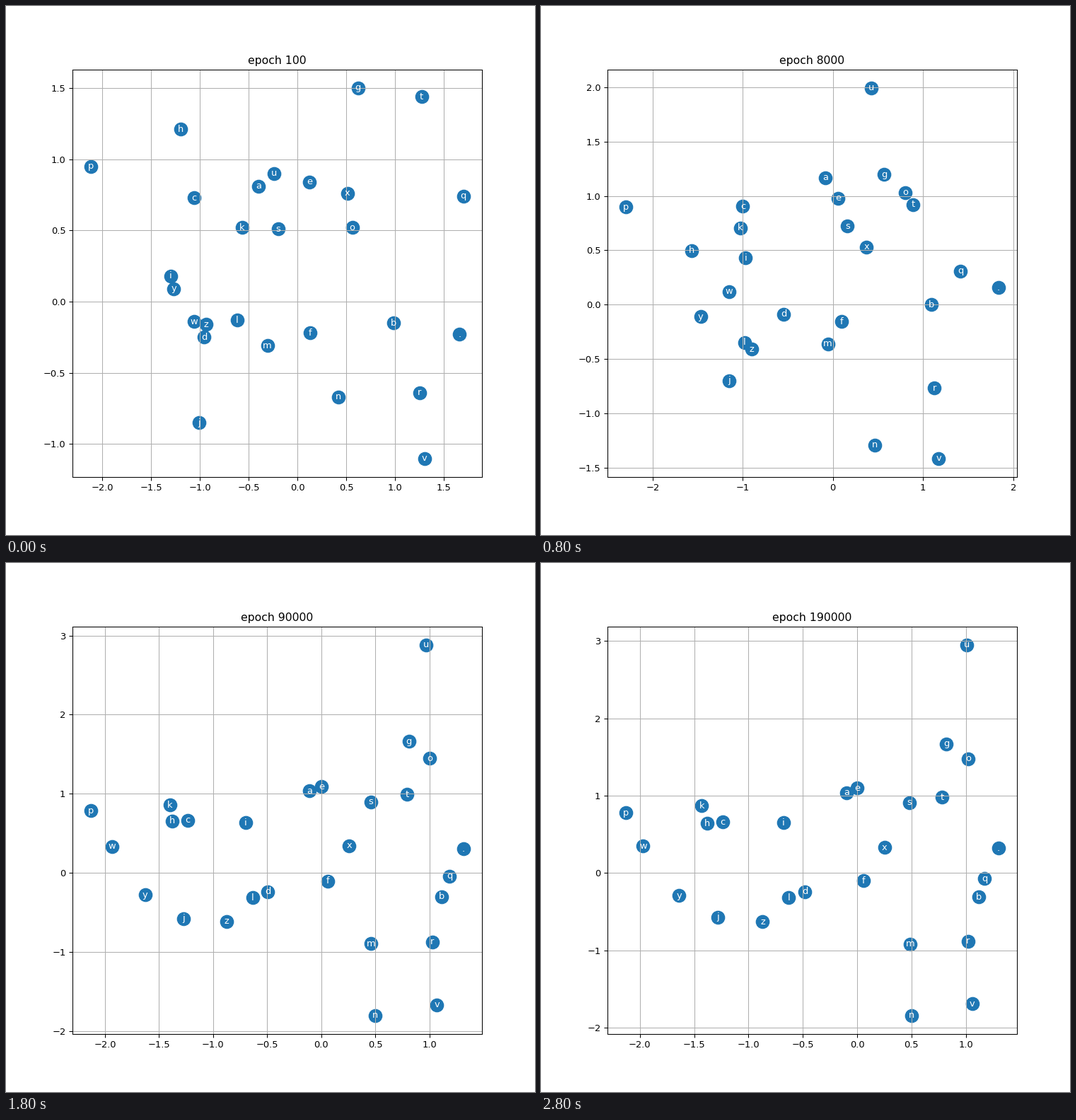
A matplotlib script that plays this animation: 748 px wide and 748 px high, repeating every 2.9 s.

```python
import numpy as np
import matplotlib.pyplot as plt
from matplotlib.animation import FuncAnimation

# Every letter drifts from its first position (x, y) to its last.
DRIFT = {
    ".": (1.66, -0.23, 1.30, 0.32), "a": (-0.40, 0.81, -0.10, 1.04),
    "b": (0.98, -0.15, 1.12, -0.31), "c": (-1.06, 0.73, -1.24, 0.66),
    "d": (-0.96, -0.25, -0.48, -0.24), "e": (0.12, 0.84, 0.00, 1.10),
    "f": (0.13, -0.22, 0.06, -0.10), "g": (0.62, 1.50, 0.82, 1.67),
    "h": (-1.20, 1.21, -1.38, 0.64), "i": (-1.30, 0.18, -0.68, 0.65),
    "j": (-1.01, -0.85, -1.28, -0.57), "k": (-0.57, 0.52, -1.43, 0.87),
    "l": (-0.62, -0.13, -0.63, -0.32), "m": (-0.31, -0.31, 0.49, -0.92),
    "n": (0.42, -0.67, 0.50, -1.84), "o": (0.56, 0.52, 1.02, 1.48),
    "p": (-2.12, 0.95, -2.13, 0.78), "q": (1.70, 0.74, 1.17, -0.07),
    "r": (1.25, -0.64, 1.02, -0.88), "s": (-0.20, 0.51, 0.48, 0.91),
    "t": (1.27, 1.44, 0.78, 0.98), "u": (-0.24, 0.90, 1.01, 2.95),
    "v": (1.30, -1.10, 1.06, -1.69), "w": (-1.06, -0.14, -1.97, 0.35),
    "x": (0.51, 0.76, 0.25, 0.33), "y": (-1.27, 0.09, -1.64, -0.29),
    "z": (-0.94, -0.16, -0.87, -0.63),
}

# Largest detour from the straight line, for the letters that take one.
DETOUR = {
    ".": (0.47, 0.12), "a": (0.20, 0.30), "b": (0.05, 0.30), "c": (0.20, 0.27),
    "d": (0.20, 0.20), "g": (-0.20, -0.50), "h": (-0.35, -0.52), "l": (-0.45, -0.15),
    "m": (-0.22, 0.35), "p": (-0.22, 0.05), "t": (-0.15, -0.35), "w": (0.50, 0.00),
}

EPOCHS = [100, *range(1000, 10000, 1000), *range(10000, 200000, 10000)]

drift = np.array(list(DRIFT.values()))
start, end = drift[:, :2], drift[:, 2:]
detour = np.array([DETOUR.get(letter, (0, 0)) for letter in DRIFT])


def settled(epoch):
    return 1 - np.exp(-(epoch / 11300) ** 0.57)


def progress(epoch):
    """Share of the training done: quick at first, then nearly still."""
    first, last = settled(EPOCHS[0]), settled(EPOCHS[-1])
    return (settled(epoch) - first) / (last - first)


def embedding(epoch):
    t = progress(epoch)
    bump = 6.75 * t * (1 - t) ** 2  # peaks at 1 after a third of the way
    return start + t * (end - start) + bump * detour


fig, ax = plt.subplots(figsize=(8, 8), dpi=93.5)


def draw(i):
    x, y = embedding(EPOCHS[i]).T
    ax.clear()
    ax.scatter(x, y, s=200)
    for letter, px, py in zip(DRIFT, x, y):
        ax.text(px, py, letter, ha="center", va="center", color="white")
    ax.grid(True)
    ax.set_title(f"epoch {EPOCHS[i]}")


anim = FuncAnimation(fig, draw, frames=len(EPOCHS), interval=100, repeat=True)
plt.show()
```
